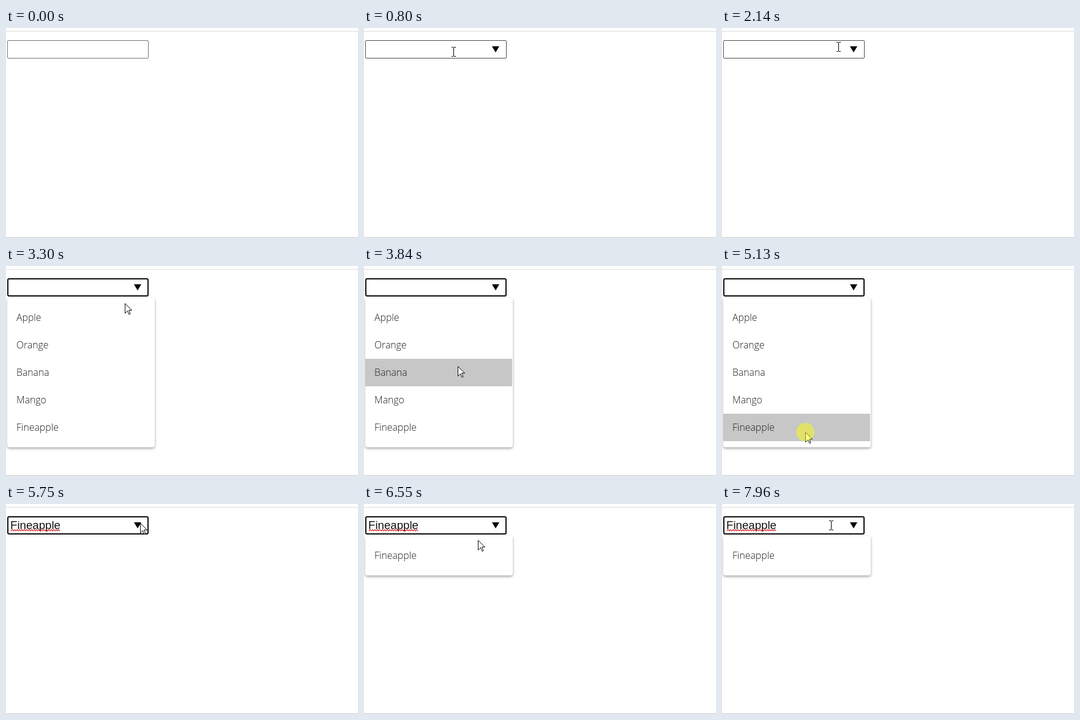
An HTML page that plays this animation: 575 by 344 pixels, repeating every 8000 ms.

```html
<!DOCTYPE html>
<html lang="en">
<head>
<meta charset="utf-8">
<title>Fruit picker</title>
<style>
  html, body { margin: 0; width: 100%; height: 100%; overflow: hidden; background: #fff; }
  #stage { position: relative; width: 575px; height: 344px; overflow: hidden; background: #fff; }
  #stage > * { position: absolute; box-sizing: border-box; }
  .rule { left: 0; width: 575px; height: 1px; }
  #field { left: 2px; top: 20px; width: 231px; height: 30px; border: 1px solid #767676; border-radius: 2px; }
  #field.hover { border-color: #4f4f4f; }
  #field.focus { border: 2px solid #101010; border-radius: 3px; }
  #list {
    left: 2px; top: 52px; width: 241px; padding: 10px 0; border-radius: 4px;
    background: #fff; box-shadow: 0 2px 4px rgba(0, 0, 0, .36);
  }
  .row {
    width: 240px; height: 45px; padding-left: 15px; box-sizing: border-box;
    font: 350 15.8px/45px "Open Sans", "Noto Sans", sans-serif; color: #1c1c1c;
  }
  .row.on { background: #c7c7c8; }
  #art { left: 0; top: 0; }
  #value text { font: 18.67px "Liberation Sans", Arial, sans-serif; fill: #161012; }
</style>
</head>
<body>
<div id="stage">
  <div class="rule" style="top:5px;background:#ddd"></div>
  <div class="rule" style="top:343px;background:#c8c8c8"></div>
  <div id="field"></div>
  <div id="list"></div>
  <svg id="art" width="575" height="344">
    <path id="drop" d="M209 30H221L215 40Z"/>
    <g id="value">
      <text x="7" y="41">Fineapple</text>
      <path id="wave" fill="none" stroke="#d21a1a" stroke-width="1.1"/>
    </g>
    <path id="arrow" d="M.5 .5V16.5L4.5 12.5L7 18.5L9 17.5L6.7 11.5H11.5Z" fill="#fff" stroke="#111" stroke-linejoin="round"/>
    <path id="beam" d="M-3-7h3v1h1v-1h3v1h-3v14h3v1h-3v-1h-1v1h-3v-1h3v-14h-3z"/>
    <circle id="press" r="15" fill="#ff0" fill-opacity=".47"/>
  </svg>
</div>
<script>
const LOOP = 8000, TICK = 67;
const FRUIT = ["Apple", "Orange", "Banana", "Mango", "Fineapple"];
const ROW = { top: 62, height: 45 };
const FOCUS = 2680, OPEN = 2820, PRESS = 5130, PICK = 5270, REPRESS = 6290, REOPEN = 6350;

// Each move starts where the one before rested: first step, last step, resting place.
const ENTRY = [560, 352];
const MOVES = [
  [70, 600, 146, 41],    // in from the corner
  [800, 800, 146, 38],
  [2140, 2140, 190, 30],
  [2210, 2680, 214, 29], // onto the drop arrow
  [3090, 3300, 194, 61],
  [3370, 3840, 153, 164],
  [3910, 4390, 141, 237],
  [4660, 4800, 136, 272],
  [5270, 5610, 196, 24], // back to the field
  [5670, 5820, 222, 34],
  [6020, 6090, 218, 36],
  [6500, 6550, 186, 59],
  [6620, 6760, 178, 74],
  [7490, 7960, 178, 34]
];

const $ = id => document.getElementById(id);
const show = (el, on) => { el.style.display = on ? "" : "none"; };
const between = (t, a, b) => t >= a && t < b;
const mix = (a, b, k) => Math.round(a + (b - a) * k);

const rows = FRUIT.map(name => {
  const row = document.createElement("div");
  row.className = "row";
  row.textContent = name;
  return $("list").appendChild(row);
});

let wave = "M8 44";
for (let x = 10, up = true; x <= 88; x += 2, up = !up) wave += `L${x} ${up ? 42 : 44}`;
$("wave").setAttribute("d", wave);

// The pointer moves in ticks; sideways motion eases out ahead of the vertical.
function pointer(t) {
  let [x, y] = ENTRY;
  for (const [from, to, nx, ny] of MOVES) {
    if (t < from) break;
    const steps = Math.round((to - from) / TICK) + 1;
    const p = t >= to ? 1 : (Math.floor((t - from) / TICK) + 1) / steps;
    x = mix(x, nx, 1 - (1 - p) ** 2);
    y = mix(y, ny, p);
  }
  return [x, y];
}

function draw(t) {
  const [x, y] = pointer(t);
  const over = between(x, 2, 233) && between(y, 20, 50);
  const focus = t >= FOCUS, picked = t >= PICK;
  const typing = over && x < 205;

  $("field").className = focus ? "focus" : over ? "hover" : "";
  show($("drop"), over || focus);
  show($("value"), picked);
  show($("list"), between(t, OPEN, PICK) || t >= REOPEN);

  const shown = picked ? rows.slice(-1) : rows;
  const hit = between(x, 2, 242) ? shown[Math.floor((y - ROW.top) / ROW.height)] : null;
  for (const row of rows) {
    show(row, shown.includes(row));
    row.classList.toggle("on", row === hit);
  }

  for (const id of ["arrow", "beam", "press"]) $(id).setAttribute("transform", `translate(${x} ${y})`);
  show($("arrow"), !typing);
  show($("beam"), typing);
  show($("press"), between(t, FOCUS, OPEN) || between(t, PRESS, PICK) || between(t, REPRESS, REOPEN));
}

const born = performance.now();
function loop() {
  draw((performance.now() - born) % LOOP);
  requestAnimationFrame(loop);
}
loop();
</script>
</body>
</html>
```
